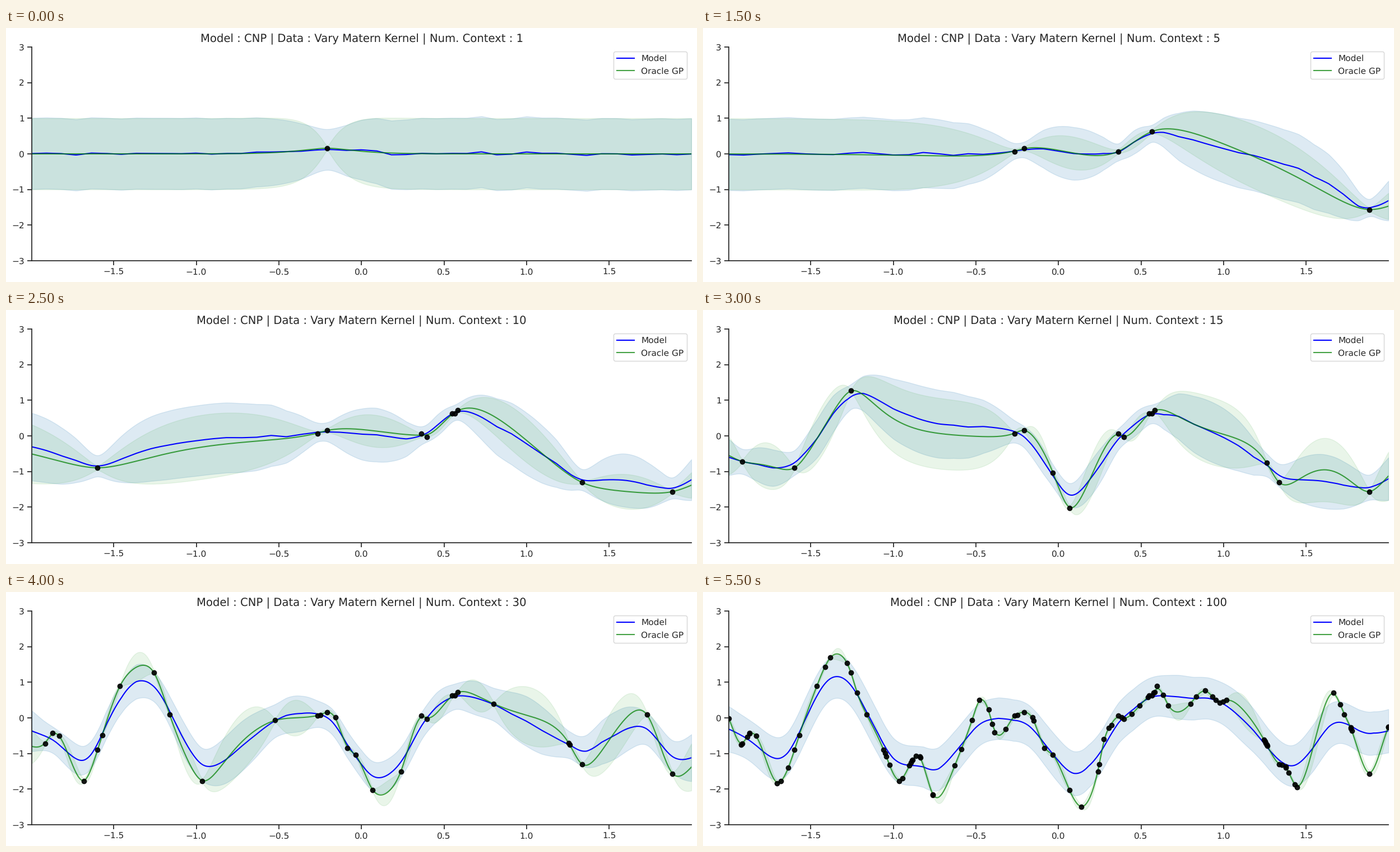
Write a matplotlib script that moves like this. It is 1233 px wide and 454 px high and loops after 6 s.

```python
import numpy as np
import matplotlib.pyplot as plt
from matplotlib.animation import FuncAnimation

WIDTH, HEIGHT, DPI = 1233, 454, 100
INK = "0.15"
COUNTS = [1, 2, 3, 5, 7, 10, 15, 20, 30, 50, 75, 100]

plt.rcParams.update({
    "font.family": "DejaVu Sans", "font.size": 11.1, "text.hinting": "none",
    "axes.titlesize": 14.1, "axes.linewidth": 1.25, "axes.edgecolor": INK,
    "text.color": INK, "xtick.color": INK, "ytick.color": INK,
    "xtick.major.size": 6, "ytick.major.size": 6,
    "xtick.major.width": 1.25, "ytick.major.width": 1.25,
    "patch.linewidth": 1, "lines.linewidth": 1.5,
})

# Key observations (x, y) in order of arrival; the rest are drawn near them.
EARLY = [
    (-.207, .16), (.362, .06), (-.267, .07), (.565, .635), (1.883, -1.57),
    (-1.598, -.9), (.582, .72), (1.335, -1.31), (.398, -.03), (.55, .63),
    (.066, -2.02), (-1.255, 1.27), (-1.915, -.72), (1.262, -.76), (-.033, -1.03),
    (-1.87, -.43), (-1.162, .1), (-.085, -.85), (-.25, .08),
]
MIDDLE = [
    (-1.57, -.49), (-.522, -.07), (.24, -1.5), (.8, .4), (-1.83, -.51),
    (1.73, .09), (-.965, -1.77), (-.158, .01), (-1.68, -1.78), (-1.462, .9),
    (-1.382, 1.69), (-1.22, .7), (-.892, -1.25), (-.76, -2.17), (-.423, .24),
    (-.318, -.31), (.138, -2.5), (.275, -.6), (.663, .35), (.976, .43),
    (1.377, -1.37), (1.77, -.27), (.445, .11),
]
LATE = [
    (-1.995, -.01), (-1.923, -.75), (-1.705, -1.83), (-.84, -1.08), (-.48, .5),
    (-.386, -.41), (.598, .89), (.89, .77), (1.445, -1.95), (1.665, .71),
    (1.997, -.26), (1.017, .51), (-1.05, -.99), (-.627, -1.33), (.32, -.2),
]

grid = np.linspace(-1.995, 1.998, 500)


def matern(a, b, scale):
    s = np.sqrt(3) * np.abs(a[:, None] - b[None, :]) / scale
    return (1 + s) * np.exp(-s)


def posterior(points, at, scale, noise):
    """Mean and variance of a unit Matern-3/2 process given noisy points."""
    x, y = np.transpose(points)
    gram = matern(x, x, scale) + noise * np.eye(len(x))
    cross = matern(at, x, scale)
    weights = np.linalg.solve(gram, cross.T).T
    variance = 1 - np.sum(weights * cross, axis=1)
    return weights @ y, np.maximum(variance, 0)


def observations():
    """Fill each group up to its size with points on the curve, clustered near known ones."""
    rng = np.random.default_rng(4)
    keys = EARLY + MIDDLE + LATE
    points = []
    for group, size in ((EARLY, 20), (MIDDLE, 50), (LATE, 100)):
        points += group
        known = np.array(points)[:, 0]
        x = rng.choice(known, size - len(points)) + rng.normal(0, .04, size - len(points))
        x = np.clip(x, grid[0], grid[-1])
        y, _ = posterior(keys, x, .22, .002)
        points += list(zip(x, y))
    return np.array(points)


POINTS = observations()


def oracle(points):
    """The fitted length scale is long while only a few points are known."""
    scale = .47 if 2 <= len(points) <= 10 else .2
    mean, variance = posterior(points, grid, scale, .005)
    return mean, np.sqrt(variance)


def model(points):
    """An underfitting smoother whose noise grows with the context, with small kinks."""
    n = len(points)
    noise = .0065 * n + .3 / n ** 2
    mean, variance = posterior(points, grid, .3, noise)
    kinks = np.random.default_rng(n).normal(0, .025, 45)
    mean = mean + np.interp(grid, np.linspace(-2, 2, 45), kinks)
    return mean, np.sqrt(variance + .4 * noise * (1 - variance))


fig = plt.figure(figsize=(WIDTH / DPI, HEIGHT / DPI), dpi=DPI, facecolor="white")
ax = fig.add_axes([46.3 / WIDTH, 38 / HEIGHT, 1176.7 / WIDTH, 382 / HEIGHT])
ax.spines[["top", "right"]].set_visible(False)


def plot_belief(mean, std, line, fill, fill_alpha, label, alpha=1):
    ax.fill_between(grid, mean - std, mean + std, color=fill, alpha=fill_alpha, zorder=1)
    ax.plot(grid, mean, color=line, alpha=alpha, label=label, zorder=2)


def draw(step):
    ax.clear()
    points = POINTS[:COUNTS[step]]
    plot_belief(*model(points), "blue", "tab:blue", .15, "Model")
    plot_belief(*oracle(points), "green", "tab:green", .1, "Oracle GP", alpha=.73)
    ax.scatter(*points.T, s=36, color="black", alpha=.9, linewidths=1, zorder=3)
    ax.set(xlim=(grid[0], grid[-1]), ylim=(-3, 3),
           xticks=np.arange(-1.5, 1.6, .5), yticks=range(-3, 4))
    ax.set_title(f"Model : CNP | Data : Vary Matern Kernel | Num. Context : {COUNTS[step]}")
    ax.legend(loc="upper right")
    return ax.get_children()


animation = FuncAnimation(fig, draw, frames=len(COUNTS), interval=500,
                          init_func=lambda: [], repeat=True, repeat_delay=0)
plt.show()
```
